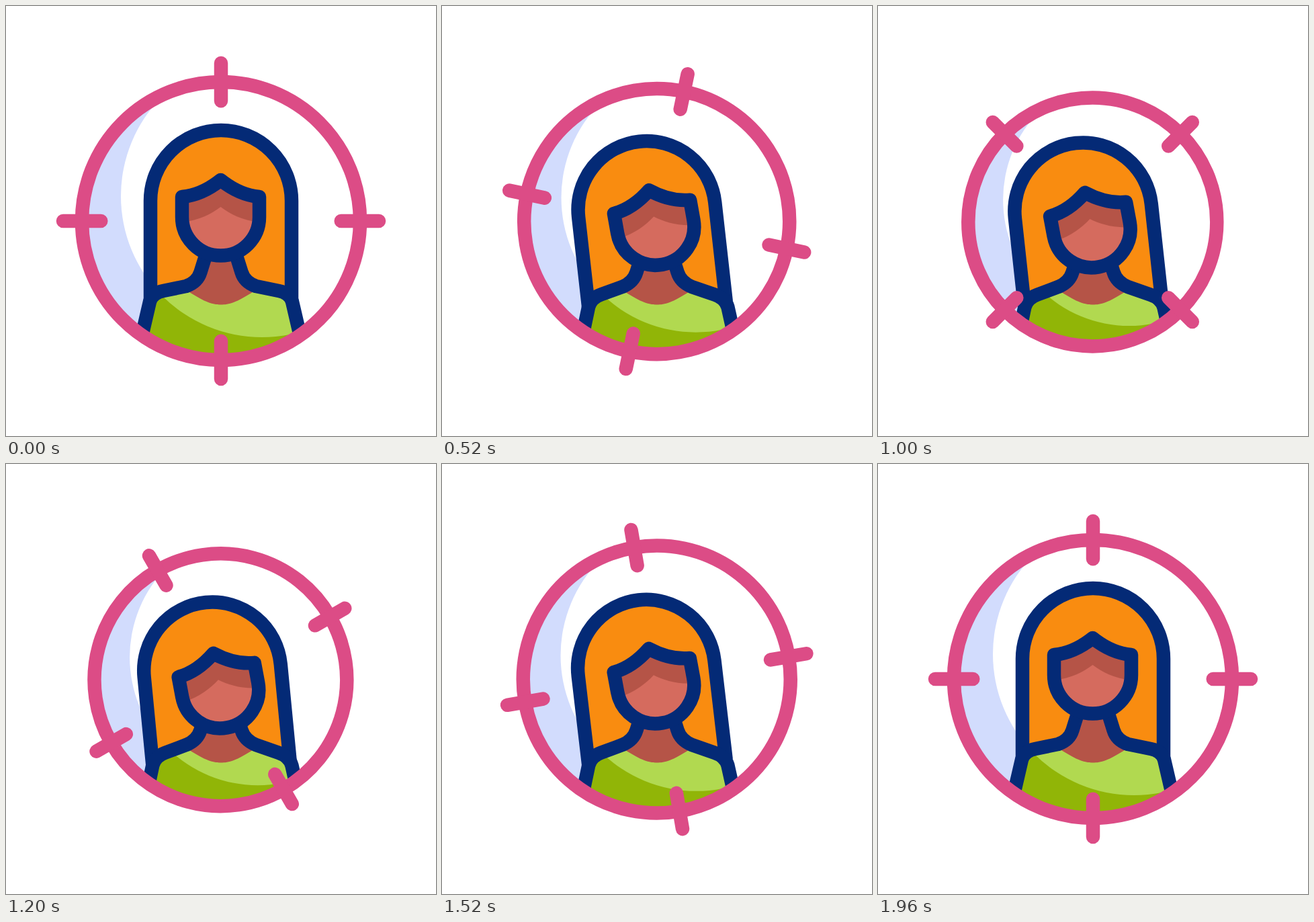
An HTML page for the animation above (2 s loop, 640 px wide and 640 px high).

```html
<!DOCTYPE html>
<html lang="en">
<head>
<meta charset="utf-8">
<title>Target audience</title>
<style>
  html, body { margin: 0; width: 100%; height: 100%; overflow: hidden; background: #fff; }
  svg { display: block; width: 100vw; height: 100vh; }
  .line { fill: none; stroke: #042a76; stroke-width: 20.5; stroke-linejoin: round; }
  .sight { fill: none; stroke: #dc4c86; stroke-width: 20.5; stroke-linecap: round; }
</style>
</head>
<body>
<svg viewBox="0 0 640 640">
  <defs>
    <clipPath id="lens"><circle class="lens"/></clipPath>
    <clipPath id="lit"><circle class="glow"/></clipPath>
  </defs>
  <g clip-path="url(#lens)">
    <circle class="lens" fill="#d2dcfd"/>
    <circle class="glow" fill="#fff"/>
    <path class="hair" fill="#f98c10"/>
    <path class="hair" fill="#fdcb50" clip-path="url(#lit)"/>
    <path class="hair line"/>
    <path class="body" fill="#91b507"/>
    <path class="body" fill="#b1d950" clip-path="url(#lit)"/>
    <path class="neck" fill="#b55447"/>
    <path class="body line"/>
    <g id="head">
      <path class="face" fill="#b55447"/>
      <path fill="#d56b5e" d="M262 322C288 319 306 309 319.5 299C333 309 351 319 377 322A57.5 57.5 0 0 1 262 322Z"/>
      <path class="face line"/>
    </g>
  </g>
  <g id="sight">
    <circle class="sight" id="ring"/>
    <path class="sight" id="ticks"/>
  </g>
</svg>
<script>
const LOOP = 2000, STEP = 40, MID = 320;

const $ = id => document.getElementById(id);
const set = (node, attrs) => {
  for (const name in attrs) node.setAttribute(name, attrs[name]);
};
const setAll = (cls, attrs) =>
  document.querySelectorAll('.' + cls).forEach(node => set(node, attrs));

// Smooth 0 to 1 between two times.
const ease = (t, from, to) => {
  const p = Math.min(1, Math.max(0, (t - from) / (to - from)));
  return p * p * (3 - 2 * p);
};

// One side from neck to arm; shoulders sink and draw in as the figure leans.
function sidePoints(side, lean) {
  const place = (dx, y) => {
    const slack = lean * Math.max(0, dx - 45);
    return [MID + side * dx + slack * (0.03 - 0.04 * side), y + 0.14 * slack];
  };
  return {
    nape: place(23, 372), neck: place(30.5, 396), bend: place(35, 411), collar: place(52, 417),
    shoulder: place(86, 424), corner: place(102, 427), arm: place(106, 440), end: place(135.5, 567)
  };
}

function bodyPaths(lean) {
  const l = sidePoints(-1, lean), r = sidePoints(1, lean);
  const leftNeck = `M${l.nape}L${l.neck}Q${l.bend} ${l.collar}`;
  const rightNeck = `L${r.collar}Q${r.bend} ${r.neck}L${r.nape}`;
  return {
    neck: `${leftNeck}L270 424C298 442 308 444.5 320 444.5S342 442 370 424${rightNeck}Z`,
    body: `${leftNeck}L${l.shoulder}Q${l.corner} ${l.arm}L${l.end}` +
      `L${r.end}L${r.arm}Q${r.corner} ${r.shoulder}${rightNeck}`
  };
}

function draw(t) {
  const shrink = ease(t, 120, 1000) - ease(t, 1000, 1880);
  const lean = ease(t, 120, 580) - ease(t, 1500, 1960);
  const nod = ease(t, 860, 1180) - ease(t, 1180, 1500);

  const radius = 207 - 22 * shrink, scale = radius / 207;
  const cx = MID - 0.7 * shrink, cy = MID + 1.4 * shrink;
  setAll('lens', { cx, cy, r: radius });
  setAll('glow', { cx: cx + 61 * scale, cy: cy - 37 * scale, r: 210 * scale });

  const inner = 178.7 * scale, outer = 235 * scale;
  set($('sight'), { transform: `translate(${cx} ${cy}) rotate(${90 * ease(t, 120, 1880)})` });
  set($('ring'), { r: radius });
  set($('ticks'), {
    d: [-1, 1].map(s => `M0 ${s * inner}V${s * outer}M${s * inner} 0H${s * outer}`).join('')
  });

  const hairR = 105 - 3 * lean, hairTop = 13 * lean + 4 * nod - 150, hairEnd = 12 * lean;
  setAll('hair', {
    d: `M${-hairR} ${hairEnd}V${hairTop}A${hairR} ${hairR} 0 0 1 ${hairR} ${hairTop}V${hairEnd}`,
    transform: `translate(${MID} 440) rotate(${-6.7 * lean + 1.2 * nod})`
  });

  const { body, neck } = bodyPaths(lean);
  setAll('body', { d: body });
  setAll('neck', { d: neck });
  set($('head'), {
    transform: `translate(${-1.8 * lean + nod} ${15 * lean + 7 * nod}) rotate(${-10.6 * lean} 319.5 314)`
  });
}

setAll('face', {
  d: 'M262 284C285 282 304.5 271 319.5 259C334.5 271 354 282 377 284V314A57.5 57.5 0 0 1 262 314Z'
});

const start = performance.now();
function tick() {
  const t = (performance.now() - start) % LOOP;
  draw(Math.floor(t / STEP) * STEP);
  requestAnimationFrame(tick);
}
tick();
</script>
</body>
</html>
```
